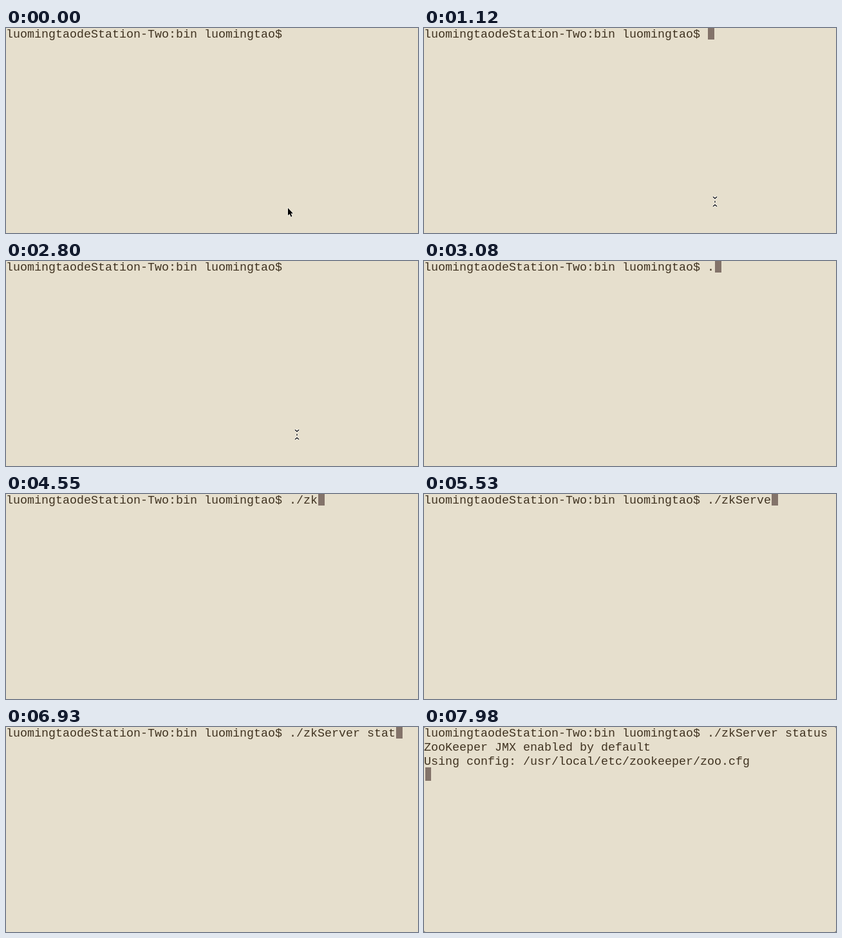
These frames come from a looping animation (640x320 px, 8 s). An HTML page:

```html
<!DOCTYPE html>
<html>
<head>
<meta charset="utf-8">
<style>
html, body { margin: 0; width: 100%; height: 100%; overflow: hidden; background: #77736a; }
#stage { position: relative; width: 640px; height: 320px; overflow: hidden; background: #e6dfcd; }
pre {
  position: absolute; left: 0; top: 0; margin: 0;
  font: 18.34px/22px "Liberation Mono", monospace; color: #403321;
}
#caret {
  display: inline-block; position: relative; left: 1.5px; top: -3px; vertical-align: top;
  width: 9.5px; height: 21px; background: #83736a;
}
svg { position: absolute; left: 0; top: 0; }
.halo { stroke: #fff; stroke-width: 3; }
.line { stroke: #111; stroke-width: 1.4; }
</style>
</head>
<body>
<div id="stage">
  <pre><span id="text"></span><span id="caret"></span></pre>
  <svg width="640" height="320" fill="none">
    <defs>
      <path id="bars" d="M449 263.5L452 266L455 263.5M449 278.5L452 276L455 278.5M452 270V272.5"/>
    </defs>
    <path id="arrow" d="M438 281V292.6L440.6 290.2L442.7 294.8L444.4 294L442.4 289.6H445.8Z"
      fill="#000" stroke="#f6f3ea" stroke-width="1.4" paint-order="stroke"/>
    <g id="beam">
      <use href="#bars" class="halo"/>
      <use href="#bars" class="line"/>
    </g>
  </svg>
</div>
<script>
const LOOP = 8000, BLINK = 560, ENTER = 7770;
const prompt = 'luomingtaodeStation-Two:bin luomingtao$ ';
const command = './zkServer status';
const output = '\nZooKeeper JMX enabled by default\nUsing config: /usr/local/etc/zookeeper/zoo.cfg\n';
// Time of each key press, one per character of the command
const keys = [2940, 3150, 3570, 3990, 4620, 4690, 4830, 5250, 5460, 5670,
  5880, 6090, 6300, 6510, 6720, 7000, 7210];

const el = id => document.getElementById(id);
const show = (id, on) => el(id).style.visibility = on ? 'visible' : 'hidden';

function draw(t) {
  const typed = keys.filter(k => t >= k).length;
  const entered = t >= ENTER;
  const text = prompt + command.slice(0, typed) + (entered ? output : '');
  if (el('text').textContent !== text) el('text').textContent = text;

  const blinkOn = t >= 70 && Math.floor(t / BLINK) % 2 === 0;
  show('caret', typed > 0 || blinkOn);
  show('arrow', t < 70);
  show('beam', t >= 70 && typed === 0);
  el('stage').style.borderRadius = entered ? '3px' : '0';
}

const start = performance.now();
function tick() {
  draw((performance.now() - start) % LOOP);
  requestAnimationFrame(tick);
}
tick();
</script>
</body>
</html>
```
